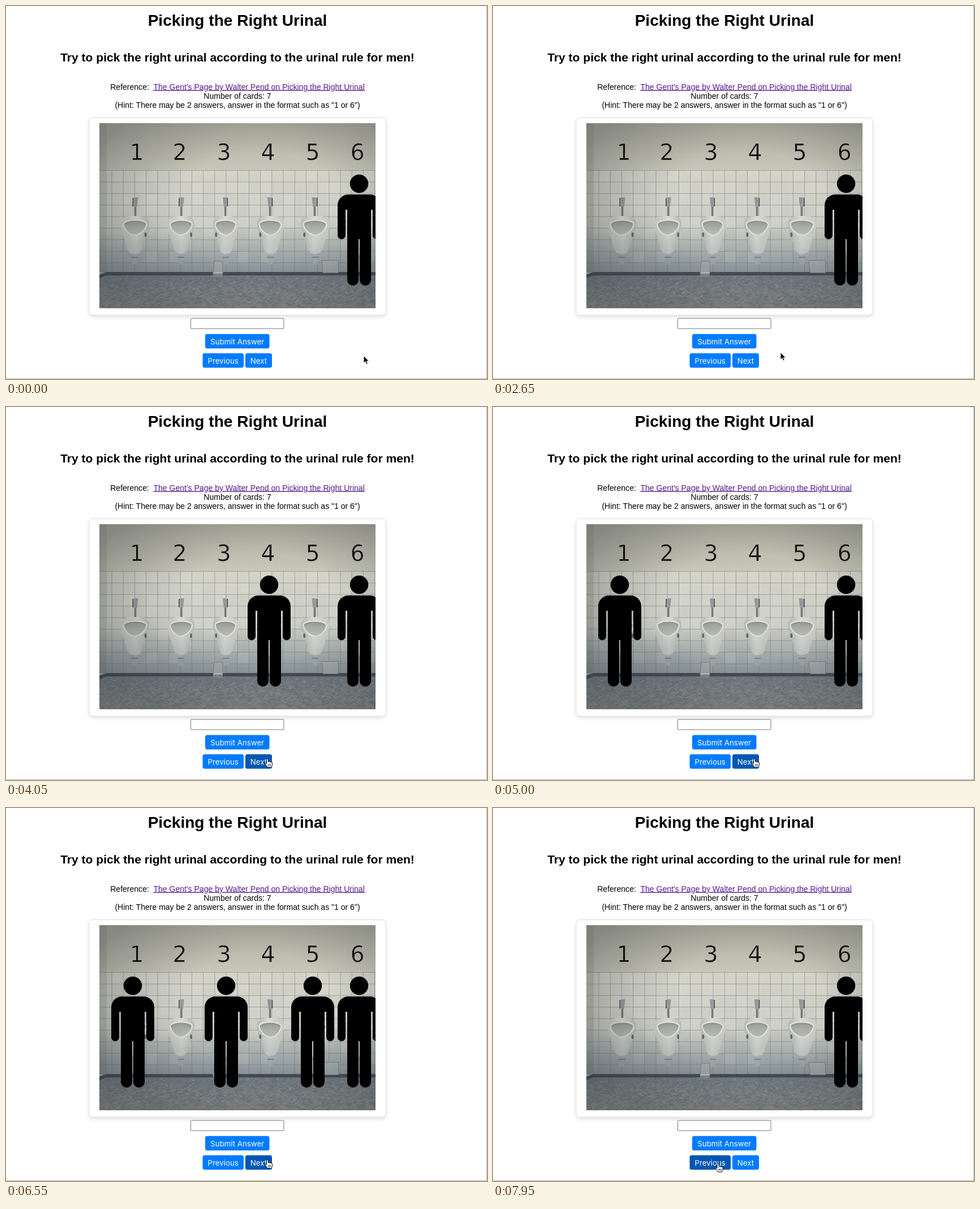
Animation, 850 px wide and 659 px high, one loop 8 s. Source, as an HTML page:

```html
<!DOCTYPE html>
<html lang="en">
<head>
<meta charset="utf-8">
<title>Picking the Right Urinal</title>
<style>
html, body { margin: 0; width: 100%; height: 100%; overflow: hidden; background: #fff; }
svg { display: block; width: 850px; height: 659px; }
text { white-space: pre; }
.page { font: 14.04px "Liberation Sans", Arial, sans-serif; text-anchor: middle; }
.h1 { font-size: 28.08px; font-weight: bold; }
.h2 { font-size: 21.06px; font-weight: bold; }
.link { fill: #551a8b; text-decoration: underline; }
.btn { fill: #007bff; }
.label { font: 13.3px Inter, Roboto, sans-serif; fill: #fff; text-anchor: middle; }
.nums { font: 39.5px "DejaVu Sans", sans-serif; text-anchor: middle; fill: #0b0b0b; stroke: #b9b8aa; stroke-width: .6; }

/* one loop is 8 s, so 1% = 80 ms */
.anim { animation: 8s linear infinite; }
.step { animation: 8s step-end infinite; }
#man1 { animation-name: man1; }
#man1s { animation-name: man1s; }
#man2 { animation-name: man2; }
#man3, #man5 { animation-name: man35; }
#man4 { animation-name: man4; }
#man6 { animation-name: man6; }
#next { animation-name: next; }
#prev { animation-name: prev; }
#arrow { animation-name: arrow; }
#hand { animation-name: hand; }
#cursor { animation-name: move; animation-timing-function: ease-in-out; }

@keyframes man1 { 0%, 68.125%, 86.875%, 100% { opacity: 0 } 55%, 81.875% { opacity: 1 } }
@keyframes man1s { 0%, 76.25%, 100% { opacity: 0 } 68.125% { opacity: 1 } }
@keyframes man2 { 0%, 81.875%, 100% { opacity: 0 } 76.25% { opacity: 1 } }
@keyframes man35 { 0%, 86.875%, 100% { opacity: 0 } 81.875% { opacity: 1 } }
@keyframes man4 { 0%, 60.625%, 100% { opacity: 0 } 49.375% { opacity: 1 } }
@keyframes man6 { 0%, 60.625%, 76.25%, 100% { opacity: 1 } 55%, 68.125% { opacity: 0 } }
@keyframes next { 0%, 43.4%, 96%, 100% { fill: #007bff } 47.2%, 92.3% { fill: #0056b3 } }
@keyframes prev { 0%, 92.8% { fill: #007bff } 96.9%, 100% { fill: #0056b3 } }
@keyframes arrow { 0%, 100% { opacity: 1 } 42.8% { opacity: 0 } }
@keyframes hand { 0%, 100% { opacity: 0 } 42.8% { opacity: 1 } }
@keyframes move {
  0%, 4.1% { transform: translate(632px, 618px) }
  8.75%, 11% { transform: translate(549px, 609px) }
  16.25%, 19.2% { transform: translate(539px, 616px) }
  20%, 23.3% { transform: translate(538px, 608px) }
  33.125% { transform: translate(508px, 612px) }
  38.125%, 41% { transform: translate(500px, 615px) }
  43.1% { transform: translate(464.5px, 622px) }
  45%, 90.4% { transform: translate(462px, 621.5px) }
  95% { transform: translate(399px, 632px) }
  97%, 100% { transform: translate(397.5px, 628px) }
}
</style>
</head>
<body>
<svg viewBox="0 0 850 659" xmlns="http://www.w3.org/2000/svg">
  <defs>
    <filter id="shadow" x="-10%" y="-10%" width="120%" height="120%">
      <feDropShadow dx="0" dy="3" stdDeviation="3" flood-opacity=".12"/>
    </filter>
    <clipPath id="frame"><rect x="165" y="207" width="488" height="327"/></clipPath>
    <linearGradient id="plaster" x2="0" y2="1">
      <stop offset="0" stop-color="#b0afa1"/><stop offset="1" stop-color="#c8c7b9"/>
    </linearGradient>
    <linearGradient id="tiles" x2="0" y2="1">
      <stop offset="0" stop-color="#d3d3c8"/><stop offset=".5" stop-color="#cccdc4"/>
      <stop offset="1" stop-color="#a7adad"/>
    </linearGradient>
    <linearGradient id="floor" x2="0" y2="1">
      <stop offset="0" stop-color="#717a83"/><stop offset="1" stop-color="#8c8d8b"/>
    </linearGradient>
    <linearGradient id="dusk" x2="0" y2="1">
      <stop offset="0" stop-color="#4d6273" stop-opacity="0"/>
      <stop offset="1" stop-color="#4d6273" stop-opacity=".3"/>
    </linearGradient>
    <radialGradient id="vignette" cx=".58" cy=".45" r=".66">
      <stop offset=".45" stop-color="#2b3135" stop-opacity="0"/>
      <stop offset="1" stop-color="#2b3135" stop-opacity=".32"/>
    </radialGradient>
    <linearGradient id="china">
      <stop offset="0" stop-color="#b4b8b4"/><stop offset=".45" stop-color="#d9dad2"/>
      <stop offset="1" stop-color="#c6c8c1"/>
    </linearGradient>
    <linearGradient id="bowl" x2="0" y2="1">
      <stop offset="0" stop-color="#969993"/><stop offset="1" stop-color="#c0c2ba"/>
    </linearGradient>

    <g id="urinal">
      <path d="M-1 338V371" stroke="#71777a" stroke-width="3.5"/>
      <path d="M-6 338H1V355H-4Z" fill="#91979a"/>
      <path d="M3 339V354" stroke="#4b5154" stroke-width="2"/>
      <rect x="-5" y="438" width="10" height="19" rx="4" fill="#b5b9b5"/>
      <path d="M-6 444H6" stroke="#858b8b" stroke-width="2"/>
      <path d="M-25 384C-25 372-12 371 0 371S25 372 25 384C25 400 17 412 14 426C12 442-10 442-12 430C-15 414-25 400-25 384Z" fill="url(#china)"/>
      <path d="M-21 385C-20 376 18 376 20 386C18 396 9 404 1 405C-8 405-20 396-21 385Z" fill="url(#bowl)" stroke="#e6e6de" stroke-width="2"/>
      <path d="M-18 386C-12 379 12 379 17 386" fill="none" stroke="#858984"/>
      <ellipse cx="-19" cy="404" rx="2" ry="4" fill="#60676a"/>
    </g>

    <g id="man">
      <circle cy="314" r="16.2"/>
      <path d="M-38 352a19 19 0 0 1 19-19H19a19 19 0 0 1 19 19V405a7 7 0 0 1-14 0V360H21V484a10 10 0 0 1-20 0V412H-1V484a10 10 0 0 1-20 0V360H-24V405a7 7 0 0 1-14 0Z"/>
    </g>
  </defs>

  <rect width="850" height="659" fill="#fff"/>
  <path d="M849.5 0V658.5H0" fill="none" stroke="#b4b4b4"/>

  <g class="page">
    <text class="h1" x="409" y="35">Picking the Right Urinal</text>
    <text class="h2" x="409" y="97.5">Try to pick the right urinal according to the urinal rule for men!</text>
    <text x="409" y="147.5">Reference:&#160; <tspan class="link">The Gent's Page by Walter Pend on Picking the Right Urinal</tspan></text>
    <text x="409" y="163.5">Number of cards: 7</text>
    <text x="409" y="179.5">(Hint: There may be 2 answers, answer in the format such as "1 or 6")</text>
  </g>

  <rect x="147" y="197.5" width="524" height="348.5" rx="6" fill="#fff" stroke="#ddd" filter="url(#shadow)"/>

  <g clip-path="url(#frame)">
    <rect x="165" y="207" width="488" height="84" fill="url(#plaster)"/>
    <rect x="165" y="290" width="488" height="182" fill="url(#tiles)"/>
    <path id="pale" fill="#e2e2d8" opacity=".2"/>
    <path id="grid" fill="none" stroke="#7f8481" opacity=".6"/>
    <path d="M165 207H178V472L165 478Z" fill="#6e726c" opacity=".2"/>
    <rect x="165" y="476" width="488" height="58" fill="url(#floor)"/>
    <path id="dark" stroke="#515960" opacity=".4"/>
    <path id="light" stroke="#b4b5b2" opacity=".4"/>
    <path d="M165 474L178 470H653V476H178L165 481Z" fill="#434c54"/>
    <g id="urinals"></g>
    <g fill="#bcbfb9" stroke="#858c8a">
      <path d="M368 451H383V473H366Z"/><path d="M558 449.5H587.5V471H560Z"/>
    </g>
    <path d="M366 473H383V478H366Z" fill="#818887"/>
    <rect x="165" y="390" width="488" height="80" fill="url(#dusk)"/>
    <rect x="165" y="207" width="488" height="327" fill="url(#vignette)"/>
    <g class="nums" id="nums"></g>
    <g id="men"></g>
  </g>

  <rect x="326.5" y="552" width="164.5" height="18" rx="1" fill="#fff" stroke="#767676"/>
  <rect class="btn" x="352" y="579.5" width="113.5" height="25.5" rx="3.5"/>
  <rect class="btn anim" id="prev" x="347.5" y="613.5" width="72.5" height="25.5" rx="3.5"/>
  <rect class="btn anim" id="next" x="423" y="613.5" width="47" height="25.5" rx="3.5"/>
  <g class="label">
    <text x="408.8" y="597.5">Submit Answer</text>
    <text x="383.7" y="631.5">Previous</text>
    <text x="446.5" y="631.5">Next</text>
  </g>

  <g class="anim" id="cursor">
    <path class="step" id="arrow" d="M0 0V13L3 10.2L5 14.8L7.3 13.8L5.3 9.4H9.3Z" fill="#000" stroke="#fff"/>
    <path class="step" id="hand" d="M-1.6 1.6C-1.6-.4 1.4-.4 1.4 1.6V5.4C2 4.4 4 4.6 4.1 5.9C4.8 5 6.5 5.3 6.6 6.6C7.5 6 8.8 6.5 8.8 7.9V10.2C8.8 12 7.6 12.8 7.4 15H-.4C-.8 12.8-3.4 10.8-4.2 8.9C-4.5 7.6-3 7.2-1.6 8.8ZM1.4 9.5V12.5M3.6 9.5V12.5M5.8 9.5V12.5" fill="#fff" stroke="#000"/>
  </g>
</svg>

<script>
const $ = id => document.getElementById(id);

let seed = 7;
const rand = () => (seed = seed * 16807 % 2147483647) / 2147483647;

// wall tiles
let grid = '', pale = '';
for (let x = 187; x < 653; x += 20.2) grid += `M${x} 290V471`;
for (let y = 290.5; y < 471; y += 20.4) {
  grid += `M165 ${y}H653`;
  for (let x = 187; x < 653; x += 20.2)
    if (rand() < .35 && y < 450) pale += `M${x} ${y}h20.2v20.4h-20.2Z`;
}
$('grid').setAttribute('d', grid);
$('pale').setAttribute('d', pale);

// floor: slanted dashes that grow towards the viewer
const dashes = () => {
  let d = '';
  for (let i = 0; i < 900; i++) {
    const depth = rand(), len = 3 + 5 * depth;
    const slant = rand() < .5 ? -.5 : .5;
    d += `M${(165 + 488 * rand()).toFixed(1)} ${(478 + 56 * depth).toFixed(1)}l${len.toFixed(1)} ${(len * slant).toFixed(1)}`;
  }
  return d;
};
$('dark').setAttribute('d', dashes());
$('light').setAttribute('d', dashes());

// the row is seen from the middle: outer urinals look wider and turn inwards
$('urinals').innerHTML = [227.5, 309, 388.5, 467.5, 546.5, 625.5].map((x, i) => {
  const wide = .9 + .055 * Math.abs(i - 2);
  return `<use href="#urinal" transform="translate(${x})scale(${i < 2 ? -wide : wide} 1)"/>`;
}).join('');

$('nums').innerHTML = [231, 307, 385, 463, 542, 621].map((x, i) =>
  `<text x="${x}" y="271.5">${i + 1}</text>`).join('');

const man = (id, place) =>
  `<g class="step" id="man${id}"><use href="#man" transform="${place}"/></g>`;
$('men').innerHTML = [224, 306, 389, 465, 542, 624].map((x, i) =>
  man(i + 1, `translate(${x})`)).join('') + man('1s', 'translate(218 13.5)scale(.965 .961)');
</script>
</body>
</html>
```
